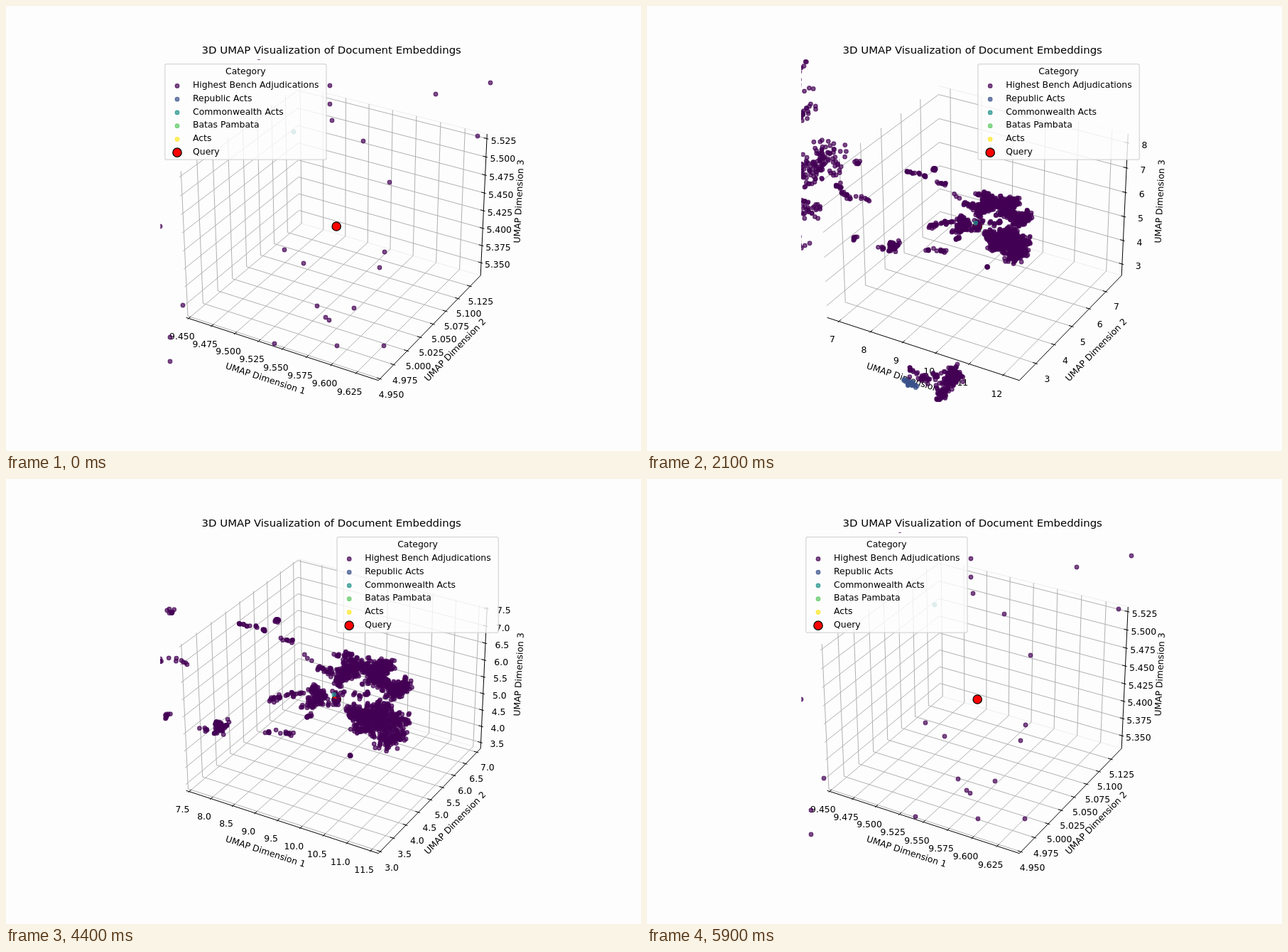
Write an HTML page with a canvas that moves like this. It is 894 px wide and 626 px high and loops after 6000 ms.

```html
<!DOCTYPE html>
<html lang="en">
<head>
<meta charset="utf-8">
<title>3D scatter zoom</title>
<style>
html, body { margin: 0; width: 100%; height: 100%; overflow: hidden; background: #fdfdfd; }
canvas { display: block; width: 894px; height: 626px; }
</style>
</head>
<body>
<canvas id="stage" width="894" height="626"></canvas>
<script>
const ctx = document.getElementById('stage').getContext('2d');
const PT = 89.4 / 72;                       // pixels per point
const FONT = 10 * PT;
const CX = 464.7, CY = 309.6, SCALE = 2605.4;
const BOX = [1.1905, 1.1905, 0.8929];
const QUERY = [9.5472, 5.0472, 5.4313];     // the view is centred here
const LAST = 29, STEP_MS = 100, LOOP_MS = 6000;
const COLORS = ['68,1,84', '59,82,139', '33,145,140', '94,201,98', '253,231,37'];
const LABELS = ['Highest Bench Adjudications', 'Republic Acts', 'Commonwealth Acts',
  'Batas Pambata', 'Acts', 'Query'];

const halfRange = k => 0.1 + 3.9 * k / LAST;

// ---- points: offsets from the query, in pixels at half range 1 ----
let seed = 7;
function rnd() {
  seed = (seed + 0x6D2B79F5) | 0;
  let t = Math.imul(seed ^ (seed >>> 15), 1 | seed);
  t = (t + Math.imul(t ^ (t >>> 7), 61 | t)) ^ t;
  return ((t ^ (t >>> 14)) >>> 0) / 4294967296;
}
const spread = w => (rnd() + rnd() + rnd() - 1.5) * 2 * w;

const points = [];
function addPoint(x, y, h, color = 0) {
  points.push({ x: (x - CX) * h, y: (y - CY) * h, color });
}
// n points around a path; some cling to the one before, which makes clumps
function strand(h, n, width, path, color = 0) {
  let x, y;
  for (let i = 0; i < n; i++) {
    if (i && rnd() < 0.35) {
      x += spread(width / 2);
      y += spread(width / 2);
    } else {
      const u = rnd() * (path.length - 1), j = Math.floor(u);
      const a = path[j], b = path[j + 1] || a;
      x = a[0] + (b[0] - a[0]) * (u - j) + spread(width);
      y = a[1] + (b[1] - a[1]) * (u - j) + spread(width);
    }
    const near = Math.hypot(x - CX, y - CY) * h < 30;
    if (!near) addPoint(x, y, h, color);
  }
}

// outer groups, placed in the widest view
const wide = (...args) => strand(halfRange(LAST), ...args);
wide(75, 3.5, [[276, 118], [288, 98], [308, 80]]);
wide(300, 9, [[232, 148], [255, 138], [280, 152]]);
wide(110, 4.5, [[235, 200], [298, 193]]);
wide(560, 8, [[316, 238], [280, 262], [224, 225], [265, 265], [226, 260]]);
wide(190, 5, [[230, 292], [300, 292], [232, 318], [285, 325]]);
wide(28, 2, [[390, 468], [405, 475]], 1);
wide(190, 3.5, [[445, 458], [437, 468], [425, 485]]);
wide(40, 2.5, [[396, 458], [410, 469], [424, 466]]);
wide(40, 2, [[368, 331], [378, 334], [384, 324]]);
wide(30, 2, [[322, 269], [332, 280], [352, 282]]);
for (const spot of [[340, 245], [342, 321], [240, 351], [272, 364], [235, 378]]) wide(8, 1.8, [spot]);

// main cloud and its arms, placed in a closer view
const close = (...args) => strand(halfRange(10), ...args);
close(32, 1.5, [[267, 155], [307, 162], [350, 183], [376, 192], [416, 233]]);
close(12, 2, [[344, 148]]);
close(18, 3, [[222, 360]]);
close(30, 3, [[328, 311], [395, 295]]);
close(18, 2, [[322, 375], [378, 381]]);
close(18, 3, [[430, 245], [450, 253]]);
close(125, 6, [[408, 285], [440, 306], [402, 323]]);
close(10, 2, [[405, 346], [418, 342]]);
close(6, 1, [[493, 425]]);
close(25, 3.5, [[465, 221], [505, 216]]);
close(15, 5, [[480, 300], [535, 302]]);
close(600, 8, [[465, 274], [500, 240], [578, 242], [535, 258], [585, 294], [605, 282]]);
close(680, 9, [[488, 330], [525, 350], [565, 322], [540, 360], [604, 352], [505, 368], [600, 382], [560, 400]]);

// nearest neighbours, placed in the first view
for (const [x, y] of [
  [456, 112], [456, 138], [459, 161], [503, 190], [540, 248], [605, 124], [682, 108], [664, 183],
  [533, 346], [526, 368], [392, 343], [419, 362], [438, 422], [450, 438], [455, 442], [490, 425],
  [378, 475], [466, 478], [532, 478], [249, 421], [231, 466], [231, 500], [217, 310], [356, 72.5]
]) addPoint(x, y, halfRange(0));
addPoint(405, 177, halfRange(0), 2);

// ---- drawing helpers ----
// box coordinates run from -0.5 to 0.5 on each axis
function project(p) {
  const [x, y, z] = p.map((v, i) => v * BOX[i]);
  const u = 0.866 * x + 0.5 * y;
  const v = -0.25 * x + 0.433 * y + 0.866 * z;
  const depth = 10 - (0.433 * x - 0.75 * y + 0.5 * z);
  return [CX + SCALE * u / depth, CY - SCALE * v / depth];
}
function line3(color, width, ...pts) {
  ctx.strokeStyle = color;
  ctx.lineWidth = width;
  ctx.beginPath();
  for (const p of pts) ctx.lineTo(...project(p));
  ctx.stroke();
}
function text(str, x, y, size = FONT, align = 'center') {
  ctx.font = `${size}px "DejaVu Sans", sans-serif`;
  ctx.textAlign = align;
  ctx.fillStyle = '#000';
  ctx.fillText(str, x, y);
}
function disc(x, y, r, fill, stroke) {
  ctx.fillStyle = fill;
  ctx.strokeStyle = stroke;
  ctx.lineWidth = PT;
  ctx.beginPath();
  ctx.arc(x, y, r, 0, 7);
  ctx.fill();
  ctx.stroke();
}
function dot(x, y, color) {
  const c = `rgba(${COLORS[color]},0.7)`;
  disc(x, y, 2.78, c, c);
}
const queryDot = (x, y) => disc(x, y, 6.2, '#f00', '#000');

function ticks(axis, h) {
  const raw = 2 * h / 9, base = 10 ** Math.floor(Math.log10(raw));
  const step = +([1, 2, 2.5, 5, 10].find(s => s * base >= raw) * base).toPrecision(3);
  const digits = (String(step).split('.')[1] || '').length;
  const out = [];
  for (let n = Math.ceil((QUERY[axis] - h) / step); n * step <= QUERY[axis] + h; n++) {
    out.push({ f: (n * step - QUERY[axis]) / (2 * h), label: (n * step).toFixed(digits) });
  }
  return out;
}

const E = 0.5, PAD = 0.5569, FAR = 0.6237, OUT = 0.508, IN = 0.484;
const AXES = [
  { ends: [[-E, -E, -E], [E, -E, -E]], title: [0, -FAR, -FAR],
    grid: f => [[f, -E, -E], [f, E, -E], [f, E, E]],
    mark: f => [[f, -OUT, -E], [f, -IN, -E]], label: f => [f, -PAD, -PAD] },
  { ends: [[E, -E, -E], [E, E, -E]], title: [FAR, 0, -FAR],
    grid: f => [[E, f, -E], [-E, f, -E], [-E, f, E]],
    mark: f => [[OUT, f, -E], [IN, f, -E]], label: f => [PAD, f, -PAD] },
  { ends: [[E, E, -E], [E, E, E]], title: [FAR, FAR, 0],
    grid: f => [[-E, -E, f], [-E, E, f], [E, E, f]],
    mark: f => [[OUT, E, f], [IN, E, f]], label: f => [PAD, PAD, f] }
];

function drawAxes(h) {
  const all = AXES.map((_, i) => ticks(i, h));
  for (const z of [-E, E]) line3('#eeeeee', 1, [-E, E, z], [E, E, z]);
  AXES.forEach((a, i) => all[i].forEach(t => line3('#b0b0b0', 0.8 * PT, ...a.grid(t.f))));
  AXES.forEach((a, i) => {
    line3('#000', 0.8 * PT, ...a.ends);
    for (const t of all[i]) {
      line3('#000', 0.8 * PT, ...a.mark(t.f));
      const [x, y] = project(a.label(t.f));
      text(t.label, x, y + 0.8 * FONT);
    }
    const [p, q] = a.ends.map(project);
    ctx.save();
    ctx.translate(...project(a.title));
    ctx.rotate(Math.atan2(q[1] - p[1], q[0] - p[0]));
    text(`UMAP Dimension ${i + 1}`, 0, 0.26 * FONT);
    ctx.restore();
  });
}

function drawPoints(h) {
  ctx.save();
  ctx.beginPath();
  ctx.rect(217.2, 75.1, 482, 482);
  ctx.clip();
  queryDot(CX + 0.5, CY + 0.4);
  for (const p of points) {
    const x = CX + p.x / h, y = CY + p.y / h;
    if (x > 212 && x < 704 && y > 70 && y < 562) dot(x, y, p.color);
  }
  ctx.restore();
}

function drawLegend(k) {
  const x = k > 10 ? 466 : 223.8, y = k > 0 && k < 11 ? 416.4 : 81.6;
  ctx.beginPath();
  ctx.roundRect(x, y, 227.2, 134.6, 2.5);
  ctx.fillStyle = 'rgba(254,254,254,0.8)';
  ctx.fill();
  ctx.strokeStyle = 'rgba(204,204,204,0.8)';
  ctx.lineWidth = PT;
  ctx.stroke();
  text('Category', x + 113.5, y + 14.4);
  LABELS.forEach((label, i) => {
    const row = y + 18.75 * i;
    if (i < 5) dot(x + 17.2, row + 30.8, i);
    else queryDot(x + 17.2, row + 30.8);
    text(label, x + 39.2, row + 33.6, FONT, 'left');
  });
}

let shown = -1;
function render() {
  const n = Math.floor((performance.now() % LOOP_MS) / STEP_MS);
  const k = n <= LAST ? n : 2 * LAST + 1 - n;   // out, then back
  if (k !== shown) {
    shown = k;
    ctx.fillStyle = '#fdfdfd';
    ctx.fillRect(0, 0, 894, 626);
    const h = halfRange(k);
    drawAxes(h);
    drawPoints(h);
    text('3D UMAP Visualization of Document Embeddings', 458.2, 67, 12 * PT);
    drawLegend(k);
  }
  requestAnimationFrame(render);
}
render();
</script>
</body>
</html>
```
